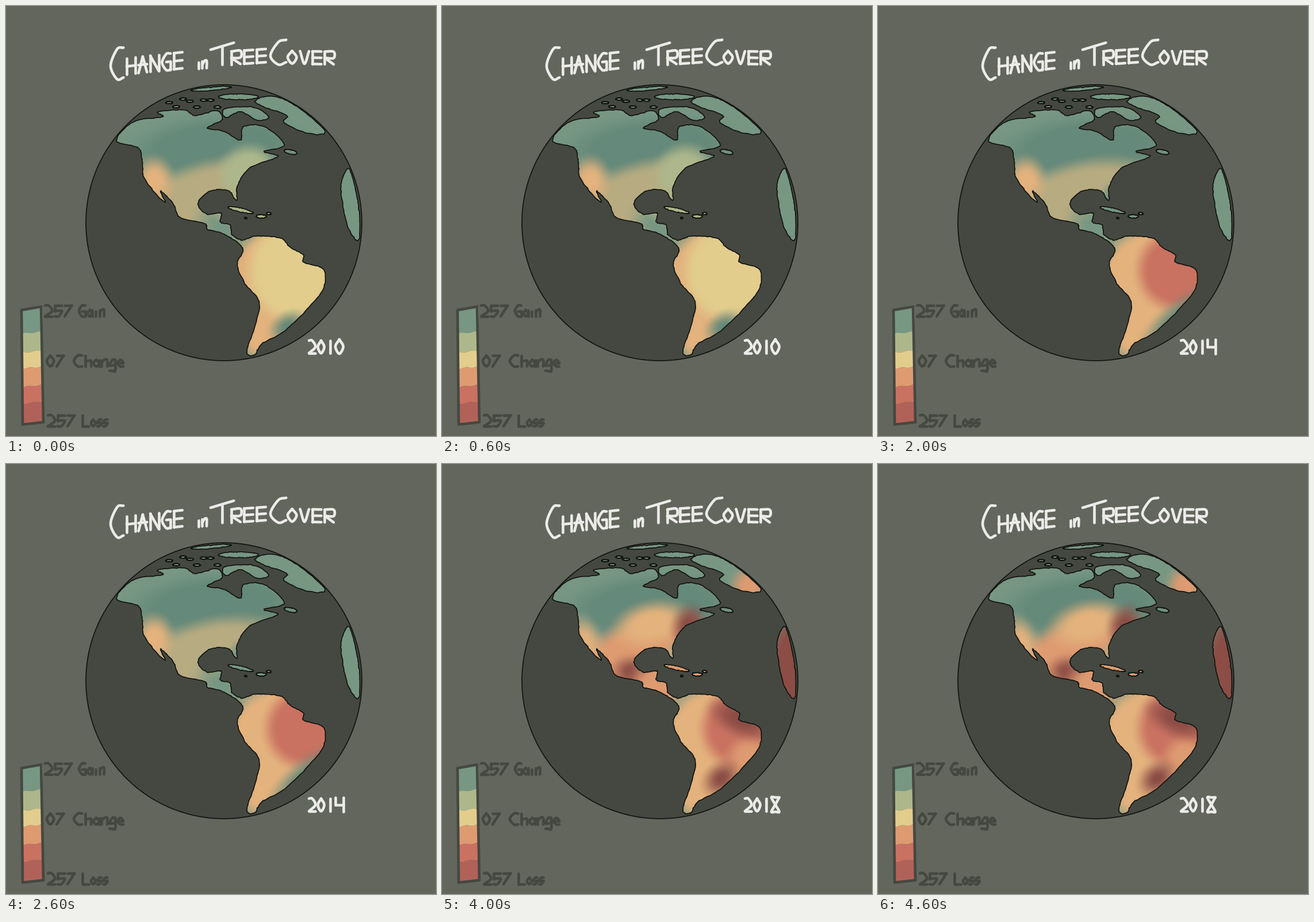
Write a matplotlib script that moves like this. It is 748 px wide and 748 px high and loops after 5000 ms.

```python
import numpy as np
import matplotlib.pyplot as plt
from matplotlib.animation import FuncAnimation
from matplotlib.patches import Circle, PathPatch, Polygon
from matplotlib.path import Path

SIZE, DPI = 748, 100
PX = 72 / DPI
PAPER, SEA, INK, CHALK = "#62665c", "#454840", "#11130f", "#ecebe9"

TEAL, DEEP, GREEN = (119, 151, 131), (101, 137, 122), (173, 183, 139)
YELLOW, TAN, PEACH = (226, 205, 141), (183, 171, 129), (227, 178, 125)
ORANGE, RED, BRICK, DARK = (222, 155, 113), (201, 114, 97), (177, 98, 88), (139, 77, 70)

rng = np.random.default_rng(4)
yy, xx = np.mgrid[0:SIZE, 0:SIZE] + 0.5


def smooth(pts, closed=False, n=10):
    """Catmull-Rom curve through the points."""
    p = np.reshape(pts, (-1, 2)).astype(float)
    if closed:
        p = np.vstack([p[-1], p, p[:2]])
    else:
        p = np.vstack([2 * p[0] - p[1], p, 2 * p[-1] - p[-2]])
    t = np.linspace(0, 1, n, endpoint=False)[:, None]
    out = [b + 0.5 * t * (c - a + t * (2 * a - 5 * b + 4 * c - d
                                       + t * (3 * (b - c) + d - a)))
           for a, b, c, d in zip(p, p[1:], p[2:], p[3:])]
    return np.vstack(out + [p[-2:-1]])


def coast(pts):
    line = smooth(pts, closed=True)
    line[1:-1] += rng.normal(0, 0.35, line[1:-1].shape)
    return Path(line, closed=True)


def isle(cx, cy, rx, ry, lean=0):
    a = np.arange(8) * np.pi / 4
    dx = rx * np.cos(a)
    return coast(np.c_[cx + dx, cy + ry * np.sin(a) + lean * dx])


# Key points of the coastlines
pacific = [192, 234, 229, 246, 237, 270, 240, 298, 262, 328, 277, 341, 269, 322,
           291, 344, 303, 368, 345, 378, 351, 389, 373, 394, 402, 411, 412, 426]
south = [402, 450, 416, 483, 440, 514, 435, 550, 419, 601, 433, 607, 445, 588,
         485, 565, 528, 523, 552, 492, 552, 458, 518, 446, 517, 433, 493, 419,
         478, 404, 435, 400]
atlantic = [411, 407, 393, 397, 390, 381, 373, 376, 374, 360, 349, 362, 334, 343,
            355, 322, 386, 321, 401, 338, 403, 312, 425, 281, 473, 262, 449, 253,
            484, 242]
arctic = [450, 210, 413, 210, 408, 233, 379, 218, 350, 212, 376, 198, 366, 182,
          330, 191, 310, 181, 264, 184, 272, 193, 222, 201]
greenland = [433, 165, 462, 157, 502, 172, 555, 218, 524, 221, 484, 203, 488, 190, 450, 176]
baffin = [380, 179, 430, 176, 457, 193, 438, 199, 408, 184, 383, 194]
africa = [597, 283, 610, 330, 615, 370, 613, 408, 595, 385, 584, 335, 584, 305]

land = Path.make_compound_path(
    *map(coast, [pacific + south + atlantic + arctic, greenland, baffin, africa]),
    isle(404, 158, 35, 5), isle(357, 144, 35, 3, -.08), isle(495, 254, 11, 4, .2),
    isle(408, 355, 22, 3.5, .22), isle(444, 366, 9, 3), isle(457, 361, 4, 2),
    isle(417, 369, 2, 1.2),
    *[isle(284 + 12 * i, 168 + 8 * np.sin(2 * i), 6, 2) for i in range(8)])

# Tinted areas: centre, radii, tilt in degrees
AREAS = dict(
    boreal=(362, 248, 130, 50, -4), states=(354, 347, 132, 70, -16),
    east=(420, 290, 46, 42, -30), plains=(320, 286, 62, 36, -14),
    midwest=(365, 279, 56, 32, -12), west=(258, 304, 26, 32), baja=(274, 318, 26, 30, 30),
    sierra=(254, 288, 20, 16), shore=(250, 308, 20, 32, -20), seaboard=(429, 281, 21, 27, 20),
    florida=(403, 332, 10, 16), oaxaca=(330, 361, 24, 19), isthmus=(374, 386, 36, 22, 35),
    cuba=(405, 355, 30, 18), haiti=(447, 365, 22, 16), newfoundland=(492, 253, 20, 16),
    fjords=(536, 211, 26, 25), sahel=(610, 355, 40, 85),
    continent=(490, 505, 112, 122), colombia=(410, 411, 28, 16), guiana=(437, 408, 58, 36, -12),
    basin=(518, 460, 62, 64), heartland=(497, 462, 72, 82), amazon=(486, 472, 54, 21, 52),
    mato=(506, 494, 28, 22), para=(520, 444, 42, 22, 25), bahia=(532, 507, 32, 26, -30),
    coffee=(516, 549, 54, 20, -43), uruguay=(490, 558, 24, 17, -35), parana=(486, 547, 25, 19, -40),
    patagonia=(430, 600, 34, 30))

# Colours in painting order
YEARS = {
    2010: dict(states=TAN, east=GREEN, west=PEACH, isthmus=TEAL, cuba=GREEN, haiti=GREEN,
               continent=PEACH, heartland=YELLOW, uruguay=DEEP),
    2012: dict(states=TAN, baja=YELLOW, sierra=PEACH, isthmus=TEAL, florida=TEAL, cuba=TEAL,
               haiti=GREEN, continent=PEACH, guiana=GREEN, basin=YELLOW, amazon=RED, mato=RED,
               coffee=DEEP, patagonia=GREEN),
    2014: dict(states=TAN, west=PEACH, isthmus=TEAL, florida=TEAL, cuba=TEAL, haiti=TEAL,
               continent=PEACH, basin=RED, coffee=DEEP),
    2016: dict(states=TAN, plains=YELLOW, shore=PEACH, isthmus=BRICK, cuba=RED, haiti=TEAL,
               newfoundland=YELLOW, fjords=YELLOW, sahel=BRICK, continent=PEACH, basin=RED,
               parana=RED, coffee=BRICK, colombia=BRICK),
    2018: dict(states=ORANGE, shore=PEACH, midwest=PEACH, seaboard=DARK, florida=TAN, oaxaca=DARK,
               isthmus=ORANGE, cuba=ORANGE, haiti=ORANGE, fjords=ORANGE, sahel=DARK,
               continent=PEACH, basin=RED, bahia=ORANGE, para=DARK, parana=DARK),
}


def cover_map(tints, feather=17):
    img = np.ones((SIZE, SIZE, 3)) * TEAL
    for name, color in {"boreal": DEEP, **tints}.items():
        cx, cy, rx, ry, tilt = (*AREAS[name], 0)[:5]
        c, s = np.cos(np.radians(tilt)), np.sin(np.radians(tilt))
        u, v = xx - cx, yy - cy
        d = np.hypot((u * c + v * s) / rx, (v * c - u * s) / ry)
        soft = min(0.9, feather / min(rx, ry))
        k = np.clip((1 + soft - d) / (2 * soft), 0, 1)
        k = (k * k * (3 - 2 * k))[..., None]
        img += k * (np.array(color) - img)
    return img.astype(np.uint8)


# Pen strokes of each letter as moves over a 3 x 3 keypad (7 top left, 3 bottom right)
PEN = {
    "A": "18 83 46", "C": "98423", "E": "71 79 46 13", "G": "98423 36 65", "H": "71 93 46",
    "L": "71 13", "N": "17 73 39", "O": "84268", "R": "71 7964 43", "T": "79 82", "V": "729",
    "0": "84268", "1": "82", "2": "7861 13", "4": "74 46 93", "5": "97 74 4621",
    "6": "841364", "8": "951235789", "%": "79 91 33",
    "a": "84268 93", "e": "468423", "g": "98456 9321", "h": "71 4563", "i": "52 88",
    "n": "71 4893", "o": "84268", "s": "984621",
}

fig = plt.figure(figsize=(SIZE / DPI, SIZE / DPI), dpi=DPI, facecolor=PAPER)
ax = fig.add_axes([0, 0, 1, 1])


def stroke(pts, color):
    return ax.plot(*smooth(pts).T, color=color, lw=4.6 * PX, solid_capstyle="round",
                   solid_joinstyle="round", zorder=5)[0]


def write(text, x, y, h, pitch, slope=0, color=CHALK):
    """Letter text by pen from x along a baseline that starts at y."""
    lines, x0 = [], x
    for ch in text:
        step = pitch * (0.7 if ch.islower() else 1)
        tall = h * (0.6 if ch in "aegnos" else 1)
        drop = h * 0.4 if ch == "g" else 0
        for keys in PEN[ch].split():
            k = np.array([int(c) - 1 for c in keys])
            px = x + k % 3 / 2 * 0.72 * step
            py = y + slope * (px - x0) + drop - k // 3 / 2 * (tall + drop)
            lines.append(stroke(np.c_[px, py], color))
        x += step
    return lines


# Globe
maps = [cover_map(t) for t in YEARS.values()]
ax.add_patch(Circle((379, 377), 240, fc=SEA, ec=INK, lw=1.7 * PX, zorder=1))
cover_img = ax.imshow(maps[0], extent=(0, SIZE, SIZE, 0), zorder=2)
cover_img.set_clip_path(land, ax.transData)
ax.add_patch(PathPatch(land, fc="none", ec=INK, lw=1.7 * PX, zorder=3))

# Legend
edges = [526, 568, 601, 629, 661, 690, 726]
x = np.linspace(28, 64, 25)


def wave(y):
    return y + 2 - (x - 28) / 9 + np.sin(x / 4 + y)


for color, top, bottom in zip([TEAL, GREEN, YELLOW, ORANGE, RED, BRICK], edges, edges[1:]):
    xs, ys = np.r_[x, x[::-1]], np.r_[wave(top), wave(bottom)[::-1]]
    ax.add_patch(Polygon(np.c_[xs, ys], fc=np.array(color) / 255, lw=0, zorder=2))
corners = [(27, 529), (61, 523), (65, 724), (29, 728)]
for a, b in zip(corners, corners[1:] + corners[:1]):
    stroke([a, b], SEA)
for y, value, vx, word, wx, pitch in [(540, "25%", 68, "Gain", 127, 15),
                                      (627, "0%", 71, "Change", 118, 20),
                                      (731, "25%", 73, "Loss", 133, 15)]:
    write(value, vx, y, 19, 17, color=SEA)
    write(word, wx, y, 19, pitch, color=SEA)

# Title and year
write("C", 182, 130, 52, 31, -.25)
write("HANGE", 210, 119, 28, 20.5, -.11)
write("in", 331, 109, 21, 15, -.05)
write("T", 356, 108, 32, 56, -.3)
write("REE", 392, 102, 23, 22, -.07)
write("C", 460, 106, 39, 38, -.3)
write("OVER", 490, 100, 22, 21.5, .02)
write("201", 527, 604, 22, 15.5)
finals = [write(str(y)[-1], 573, 605, 25, 19) for y in YEARS]

ax.set(xlim=(0, SIZE), ylim=(SIZE, 0), aspect="auto")
ax.axis("off")


def update(i):
    cover_img.set_data(maps[i])
    for k, lines in enumerate(finals):
        for line in lines:
            line.set_visible(k == i)
    return [cover_img]


anim = FuncAnimation(fig, update, frames=len(YEARS), interval=1000, repeat=True)
plt.show()
```
